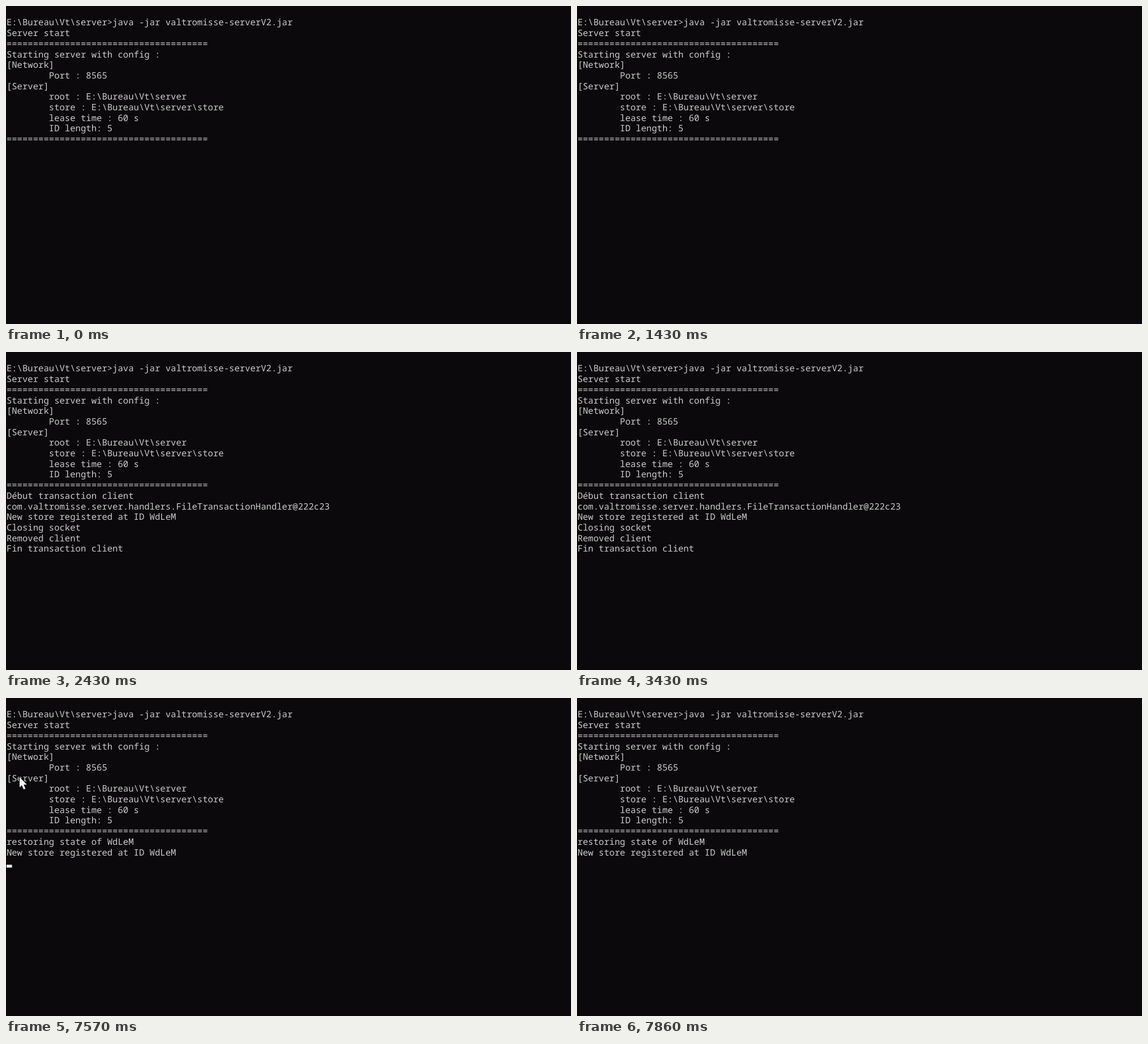
An HTML page with a canvas for the animation above (8 s loop, 998 by 561 pixels).

```html
<!DOCTYPE html>
<html lang="fr">
<head>
<meta charset="utf-8">
<title>Console</title>
<style>
  html, body { margin: 0; width: 100%; height: 100%; overflow: hidden; background: #000; }
  canvas { display: block; }
</style>
</head>
<body>
<canvas id="stage" width="998" height="561"></canvas>
<script>
const ctx = document.getElementById("stage").getContext("2d");
const LOOP = 8000;
const CELL = { w: 9.36, h: 18.7, left: 0.9, base: 34.4 };

const rule = "=".repeat(38);
const tab = " ".repeat(8);
const home = "E:\\Bureau\\Vt\\server";

const header = [
  home + ">java -jar valtromisse-serverV2.jar",
  "Server start",
  rule,
  "Starting server with config :",
  "[Network]",
  tab + "Port : 8565",
  "[Server]",
  tab + "root : " + home,
  tab + "store : " + home + "\\store",
  tab + "lease time : 60 s",
  tab + "ID length: 5",
  rule
];

const upload = [
  "Début transaction client",
  "com.valtromisse.server.handlers.FileTransactionHandler@222c23",
  "New store registered at ID WdLeM",
  "Closing socket",
  "Removed client",
  "Fin transaction client"
];

const restored = [
  "restoring state of WdLeM",
  "New store registered at ID WdLeM"
];

const scenes = [
  { at: 0, lines: header },
  { at: 1710, lines: header.concat(upload) },
  { at: 4140, lines: null },
  { at: 7570, lines: header.concat(restored), caret: true, pointer: true },
  { at: 7710, lines: header.concat(restored) }
];

// Each character sits in its own terminal cell.
function drawLine(text, row) {
  const y = CELL.base + row * CELL.h;
  [...text].forEach((ch, col) => {
    if (ch !== " ") ctx.fillText(ch, CELL.left + col * CELL.w, y);
  });
}

function drawCaret(row) {
  ctx.fillStyle = "#f2f2f2";
  ctx.fillRect(1, CELL.base + row * CELL.h - 2, 9.6, 5);
}

function drawPointer(x, y) {
  const outline = [[0, 0], [0, 18], [4, 14.4], [7.2, 21.8], [10.4, 20.4], [7.3, 13.2], [12.8, 13.2]];
  ctx.beginPath();
  outline.forEach(([dx, dy]) => ctx.lineTo(x + dx, y + dy));
  ctx.closePath();
  ctx.lineWidth = 2;
  ctx.strokeStyle = "#080808";
  ctx.stroke();
  ctx.fillStyle = "#f4f4f4";
  ctx.fill();
}

function render(scene) {
  ctx.fillStyle = scene.lines ? "#0b090b" : "#000";
  ctx.fillRect(0, 0, 998, 561);
  if (!scene.lines) return;
  ctx.font = '15.6px "Noto Sans Mono", "DejaVu Sans Mono", monospace';
  ctx.textBaseline = "alphabetic";
  ctx.textRendering = "geometricPrecision";
  ctx.fillStyle = "#cccccc";
  scene.lines.forEach(drawLine);
  if (scene.caret) drawCaret(scene.lines.length);
  if (scene.pointer) drawPointer(24, 139.5);
}

const start = performance.now();

function tick() {
  const t = (performance.now() - start) % LOOP;
  render(scenes.filter(s => s.at <= t).pop());
  requestAnimationFrame(tick);
}
tick();
</script>
</body>
</html>
```
